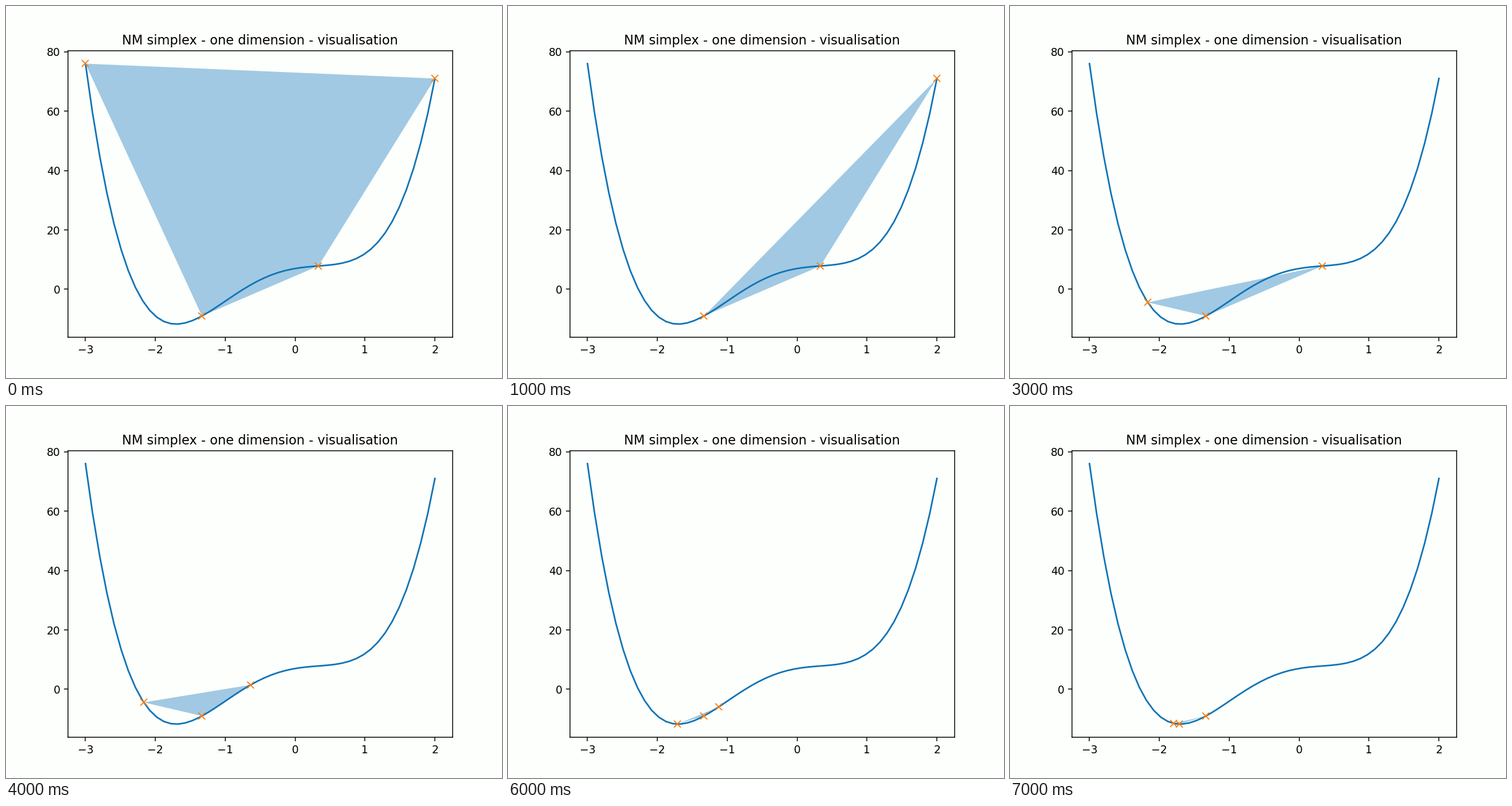
These frames come from a looping animation (864x648 px, 8000 ms). A matplotlib script:

```python
import numpy as np
import matplotlib.pyplot as plt
from matplotlib.animation import FuncAnimation

PAPER = "#fdfffc"
CURVE = "#1074b6"
AREA = "#a1c9e3"
CROSS = "#ff7f0e"

# x positions of the simplex points, one row per second
STEPS = [
    (-3, -4 / 3, 1 / 3, 2),
    (-4 / 3, 1 / 3, 2),
    (-4 / 3, 1 / 3, 11 / 18),
    (-13 / 6, -4 / 3, 1 / 3),
    (-13 / 6, -4 / 3, -0.637),
    (-13 / 6, -4 / 3, -1.126),
    (-1.714, -4 / 3, -1.126),
    (-1.796, -1.714, -4 / 3),
]


def cost(x):
    return 3 * x**4 + 4 * x**3 - 6 * x**2 + 4 * x + 7


fig, ax = plt.subplots(figsize=(6.4, 4.8), dpi=135, facecolor=PAPER)
ax.set_facecolor(PAPER)
ax.set_title("NM simplex - one dimension - visualisation")

xs = np.linspace(-3, 2, 50)
ax.plot(xs, cost(xs), color=CURVE)
ax.set_xlim(ax.get_xlim())
ax.set_ylim(ax.get_ylim())

area, = ax.fill([0, 0, 0], [0, 0, 0], color=AREA, linewidth=0)
crosses, = ax.plot([], [], "x", color=CROSS)


def draw(step):
    x = np.array(STEPS[step])
    y = cost(x)
    area.set_xy(np.column_stack([x, y]))
    crosses.set_data(x, y)
    return area, crosses


anim = FuncAnimation(fig, draw, frames=len(STEPS), interval=1000,
                     init_func=lambda: draw(0), repeat=True, repeat_delay=0)
plt.show()
```
